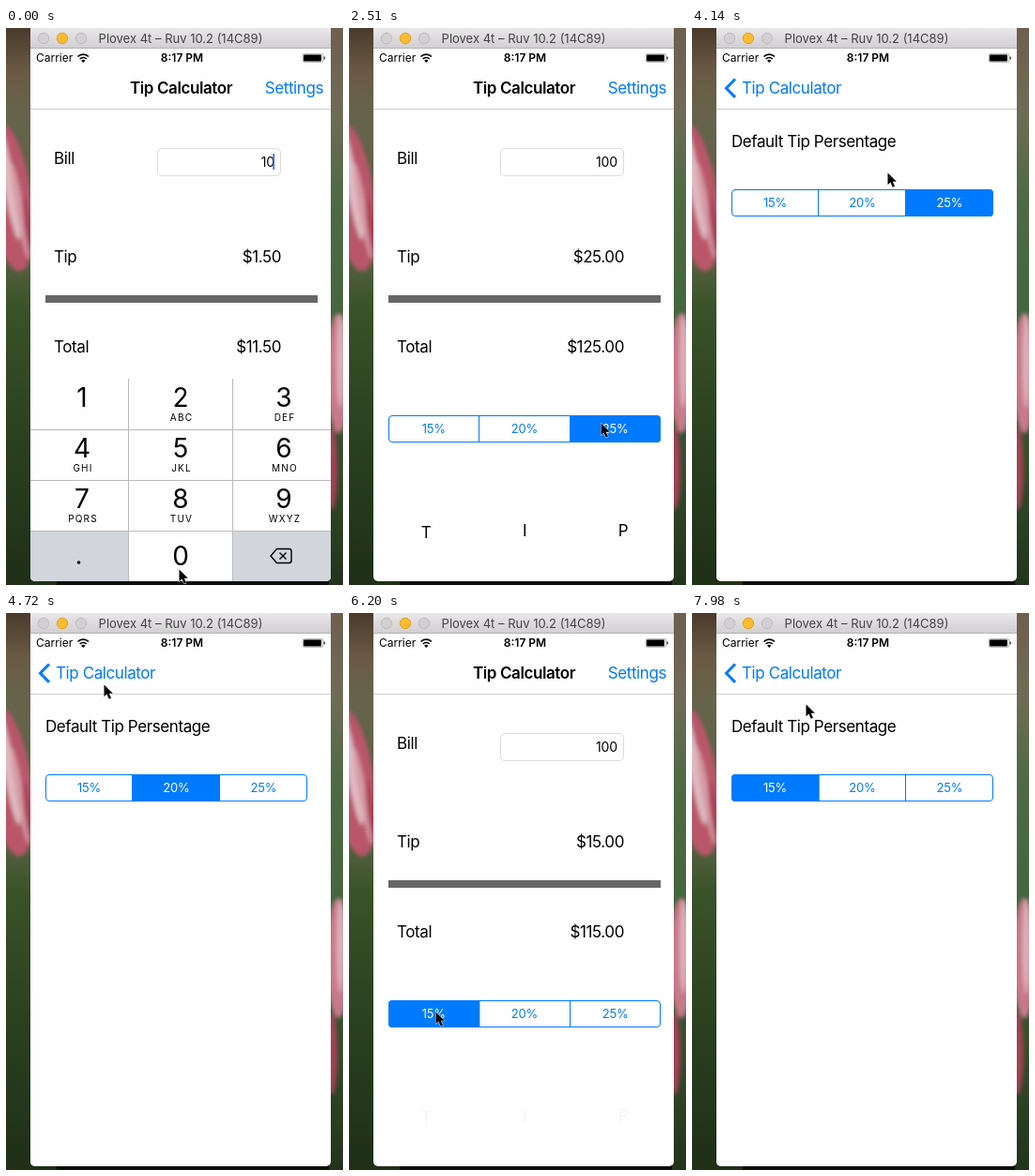
Animation, 359 px wide and 594 px high, one loop 8000 ms. Source, as an HTML page:

```html
<!DOCTYPE html>
<html lang="en">
<head>
<meta charset="utf-8">
<title>Tip Calculator</title>
<style>
html, body { margin: 0; width: 100%; height: 100%; overflow: hidden; background: #1d2a17; }
svg { display: block; }
text { font-family: Inter, "Liberation Sans", sans-serif; white-space: pre; }
</style>
</head>
<body>
<svg id="stage" width="359" height="594" viewBox="0 0 359 594"></svg>
<script>
const BLUE = '#007aff', PAGE = '#fefefe';
const $ = id => document.getElementById(id);

// y is the middle of the capitals
function label(x, y, s, o = {}) {
  const size = o.size || 17, gap = o.gap ?? (size === 17 ? -0.41 : 0);
  return `<text ${o.id ? `id="${o.id}"` : ''} x="${x}" y="${y + size * 0.36}" font-size="${size}"
    letter-spacing="${gap}" font-weight="${o.weight || 400}" fill="${o.fill || '#000'}"
    text-anchor="${o.anchor || 'start'}">${s}</text>`;
}
const rect = (x, y, w, h, fill, more = '') =>
  `<rect x="${x}" y="${y}" width="${w}" height="${h}" fill="${fill}" ${more}/>`;
const blob = (x, y, rx, ry, fill, turn = 0) =>
  `<ellipse cx="${x}" cy="${y}" rx="${rx}" ry="${ry}" fill="${fill}" transform="rotate(${turn} ${x} ${y})"/>`;
const shade = (id, ...stops) => `<linearGradient id="${id}" x2="0" y2="1">` +
  stops.map(([at, color]) => `<stop offset="${at}" stop-color="${color}"/>`).join('') + `</linearGradient>`;

// left edge of a cell, on whole pixels
const cellX = (x, w, i) => i ? Math.round(x + w * i / 3 - .6) : x;

function segments(id, x, y, w) {
  const cell = w / 3;
  let s = `<clipPath id="${id}Clip">${rect(x, y, w, 29, '#000', 'rx="4"')}</clipPath>
    <g clip-path="url(#${id}Clip)">${rect(x, y, cell + .7, 29, BLUE, `id="${id}Sel"`)}</g>
    ${rect(x + .5, y + .5, w - 1, 28, 'none', `rx="3.5" stroke="${BLUE}"`)}`;
  ['15%', '20%', '25%'].forEach((name, i) => {
    if (i) s += rect(cellX(x, w, i), y, 1, 29, BLUE);
    s += label(x + cell * (i + .5), y + 14.5, name, { id: id + i, size: 13, gap: -.2, anchor: 'middle' });
  });
  return s;
}

function select(id, x, w, n) {
  $(id + 'Sel').setAttribute('x', cellX(x, w, n));
  for (let i = 0; i < 3; i++) $(id + i).setAttribute('fill', i === n ? '#fff' : BLUE);
}

function photo() {
  return rect(0, 0, 180, 594, 'url(#leftLeaves)') + rect(180, 0, 179, 594, 'url(#rightLeaves)') +
    `<g filter="url(#soft)">` +
    blob(4, 180, 23, 80, '#b9576b', -8) + blob(3, 165, 6, 62, '#dfb9bf', -10) +
    blob(15, 195, 4, 52, '#d59aa5', -10) + blob(24, 215, 4, 36, '#a83f55', -8) +
    blob(354, 368, 12, 64, '#c7798a') + blob(356, 355, 4, 50, '#dfb0b8') +
    blob(347, 470, 6, 44, '#a34257') +
    `</g>` + rect(54, 588, 290, 6, '#0b0e0a');
}

function keyboard() {
  const keys = ['1', '2|ABC', '3|DEF', '4|GHI', '5|JKL', '6|MNO', '7|PQRS', '8|TUV', '9|WXYZ'];
  const cols = [81, 186, 296];
  let s = rect(26, 374, 320, 216, PAGE) + rect(26, 537, 104, 53, '#d2d5da') + rect(242, 537, 104, 53, '#d2d5da');
  keys.forEach((key, i) => {
    const [digit, letters] = key.split('|'), x = cols[i % 3], y = 394 + 54 * (i / 3 | 0);
    s += label(x, y, digit, { size: 28, gap: 0, anchor: 'middle' });
    if (letters) s += label(x + 1, y + 21.5, letters, { size: 10, gap: 1.2, anchor: 'middle' });
  });
  s += label(186, 563, '0', { size: 28, gap: 0, anchor: 'middle' }) + `<circle cx="77.5" cy="570" r="1.8"/>`;
  for (const y of [428, 482, 536]) s += rect(26, y, 320, 1, '#b9bbbf');
  for (const x of [130, 241]) s += rect(x, 374, 1, 216, '#b9bbbf');
  return s + `<path d="M288.500 555.500h13q2.500 0 2.500 2.500v10q0 2.500-2.500 2.500h-13l-6.500-7.500zM291.500 559.500l7 7m0-7l-7 7"
    fill="none" stroke="#000" stroke-width="1.400"/>`;
}

const mainPage = () => rect(26, 87, 320, 503, PAGE) +
  label(51, 139, 'Bill') + label(51, 244, 'Tip') + label(51, 340, 'Total') +
  rect(161.5, 128.5, 131, 29, '#fff', 'rx="4.5" stroke="#dcdcdc"') +
  label(286, 143, '', { id: 'bill', size: 14, gap: -.1, anchor: 'end' }) +
  rect(284.3, 134, 1.7, 17, '#3f6bf0', 'id="caret"') +
  label(293, 244, '', { id: 'tip', anchor: 'end' }) + label(293, 340, '', { id: 'total', anchor: 'end' }) +
  rect(42, 285, 290, 8, '#666') + segments('main', 42, 413, 290) +
  `<g id="letters">${label(82, 537.5, 'T', { anchor: 'middle' })}${label(187, 536, 'I', { anchor: 'middle' })}${
    label(292, 536, 'P', { anchor: 'middle' })}</g>`;

const settingsPage = () => rect(19, 87, 7, 503, 'url(#edge)') + rect(26, 87, 320, 503, PAGE) +
  label(42, 121, 'Default Tip Persentage') + segments('pref', 42, 172, 279);

const statusBar = () => label(32, 32, 'Carrier', { size: 12 }) +
  label(187.5, 32, '8:17 PM', { size: 12, weight: 600, anchor: 'middle' }) +
  `<g fill="none" stroke="#000" stroke-width="1.700"><path d="M76.500 30.500a8.300 8.300 0 0 1 11.500 0M78.700 33a5.200 5.200 0 0 1 7.100 0"/></g>
   <path d="M82.250 37l-2.200-2.300a3.200 3.200 0 0 1 4.400 0z"/>` +
  rect(316.25, 27.75, 21.5, 8.5, 'none', 'rx="1.5" stroke="#555" stroke-width=".5"') +
  rect(317, 28.5, 19, 7, '#000', 'rx="1"') + rect(338.5, 30.5, 1.3, 3, '#333');

const titleBar = () => rect(26, 0, 320, 22, 'url(#chrome)') + rect(26, 21, 320, 1, '#b4b4b4') +
  [['#d2d0d2', '#bdbbbd'], ['#fdbc2e', '#e0a024'], ['#d2d0d2', '#bdbbbd']].map(([fill, line], i) =>
    `<circle cx="${40 + 20 * i}" cy="11" r="5.700" fill="${fill}" stroke="${line}"/>`).join('') +
  label(186, 11.5, 'Plovex 4t – Ruv 10.2 (14C89)', { size: 13, fill: '#444', anchor: 'middle' });

const navBar = () => rect(26, 22, 320, 64, PAGE) + rect(26, 86, 320, 1, '#cfcfcf') + statusBar() +
  label(186.5, 64, 'Tip Calculator', { id: 'title', weight: 600, anchor: 'middle' }) +
  label(338, 64, 'Settings', { id: 'settings', fill: BLUE, anchor: 'end' }) +
  `<path id="chevron" d="M46 54.500l-9.500 9.700 9.500 9.700" fill="none" stroke="${BLUE}" stroke-width="3"/>` +
  label(53, 64, 'Tip Calculator', { id: 'back', fill: BLUE });

$('stage').innerHTML = `<defs>
  <filter id="soft" x="-20%" width="140%"><feGaussianBlur stdDeviation="2"/></filter>
  ${shade('chrome', [0, '#e9e7e9'], [1, '#d0ced0'])}
  ${shade('leftLeaves', [0, '#4a3a2c'], [.08, '#6a5a45'], [.16, '#66644c'], [.42, '#53613f'], [.5, '#3a5229'], [.75, '#2a3f1f'], [1, '#1f2f18'])}
  ${shade('rightLeaves', [0, '#6e5f4e'], [.15, '#6f6b56'], [.3, '#4f6a45'], [.5, '#45663f'], [.8, '#334c2a'], [1, '#22331b'])}
  <linearGradient id="edge"><stop stop-opacity="0"/><stop offset="1" stop-opacity=".14"/></linearGradient>
  <clipPath id="window">${rect(26, -6, 320, 596, '#000', 'rx="5"')}</clipPath></defs>
  ${photo()}
  <g clip-path="url(#window)">
    <svg x="26" y="87" width="320" height="503" viewBox="26 87 320 503">
      <g id="mainPage">${mainPage()}</g>
      <g id="keys">${keyboard()}</g>
      ${rect(26, 87, 320, 503, '#000', 'id="dim"')}
      <g id="settingsPage">${settingsPage()}</g>
    </svg>
    ${navBar()}${titleBar()}
  </g>
  <path id="pointer" d="M.5 .5v12.800l3-2.700 2.200 5.200 2.300-1-2.200-5.100h4z" stroke="#fff" stroke-width="1" paint-order="stroke"/>`;

const LOOP = 8000, STEP = 147.3;
const clamp = v => Math.min(1, Math.max(0, v));
const smooth = v => v * v * (3 - 2 * v);
const half = v => Math.round(v * 2) / 2;
// critically damped slide, 0 to 1
const spring = ms => { const w = Math.max(0, ms) / 50; return 1 - (1 + w) * Math.exp(-w); };

// time, x, y of the pointer
const PATH = [[0, 184, 577], [300, 184, 577], [800, 150, 342], [920, 150, 342], [1326, 147, 496],
  [1760, 186, 424], [1920, 186, 424], [2357, 268, 421], [2850, 270, 421], [3390, 306, 14], [3540, 297, 50],
  [3830, 297, 50], [4260, 180, 186], [4400, 180, 186], [4714, 104, 76], [4950, 96, 62], [5230, 96, 62],
  [5597, 152, 452], [5980, 92, 425], [6200, 92, 425], [6900, 288, 58], [7180, 288, 58], [7650, 110, 54], [7954, 121, 97]];

function pointerAt(t) {
  const i = PATH.findIndex(p => p[0] > t);
  if (i < 0) return PATH.at(-1).slice(1);
  const [a, b] = [PATH[i - 1], PATH[i]], k = smooth((t - a[0]) / (b[0] - a[0]));
  return [a[1] + (b[1] - a[1]) * k, a[2] + (b[2] - a[2]) * k];
}

const choiceAt = t => t < 1850 ? 0 : t < 2500 ? 1 : t < 4270 ? 2 : t < 6090 ? 1 : 0;
const move = (id, x, y = 0) => $(id).setAttribute('transform', `translate(${x} ${y})`);
const fade = (id, v) => $(id).setAttribute('opacity', clamp(v));

function draw(t) {
  const bill = t < 290 ? 10 : 100, choice = choiceAt(t), tip = bill * (15 + 5 * choice) / 100;
  const push = spring(t - 3618) - spring(t - 5230) + spring(t - 7150);
  const editing = t < 900;

  $('bill').textContent = bill;
  $('tip').textContent = '$' + tip.toFixed(2);
  $('total').textContent = '$' + (bill + tip).toFixed(2);
  fade('caret', editing ? 1 : 0);
  select('main', 42, 290, choice);
  select('pref', 42, 279, choice);
  fade('letters', t < 5230 ? 1 : smooth(clamp((t - 5620) / 4900)));

  move('keys', 0, Math.round(216 * spring(t - 900)));
  fade('keys', t < 1300 ? 1 : 0);
  move('mainPage', half(-96 * push));
  move('settingsPage', half(320 * (1 - push)));
  fade('settingsPage', push > 0.01 ? 1 : 0);
  fade('dim', 0.1 * push);

  const pressed = (t > 3500 && t < 5000) || t > 7000;
  move('title', half(-64 * push));
  fade('title', 1 - 1.65 * push);
  fade('settings', (pressed ? 0.25 : 1) * (1 - push));
  fade('chevron', push ** 3);
  move('back', half(78 * (1 - push)));
  fade('back', (push - 0.4) / 0.6 * (t > 5140 && t < 5600 ? 0.3 : 1));
  move('pointer', ...pointerAt(t).map(Math.round));
}

function tick() {
  draw(Math.floor(performance.now() % LOOP / STEP) * STEP);
  requestAnimationFrame(tick);
}
tick();
</script>
</body>
</html>
```
